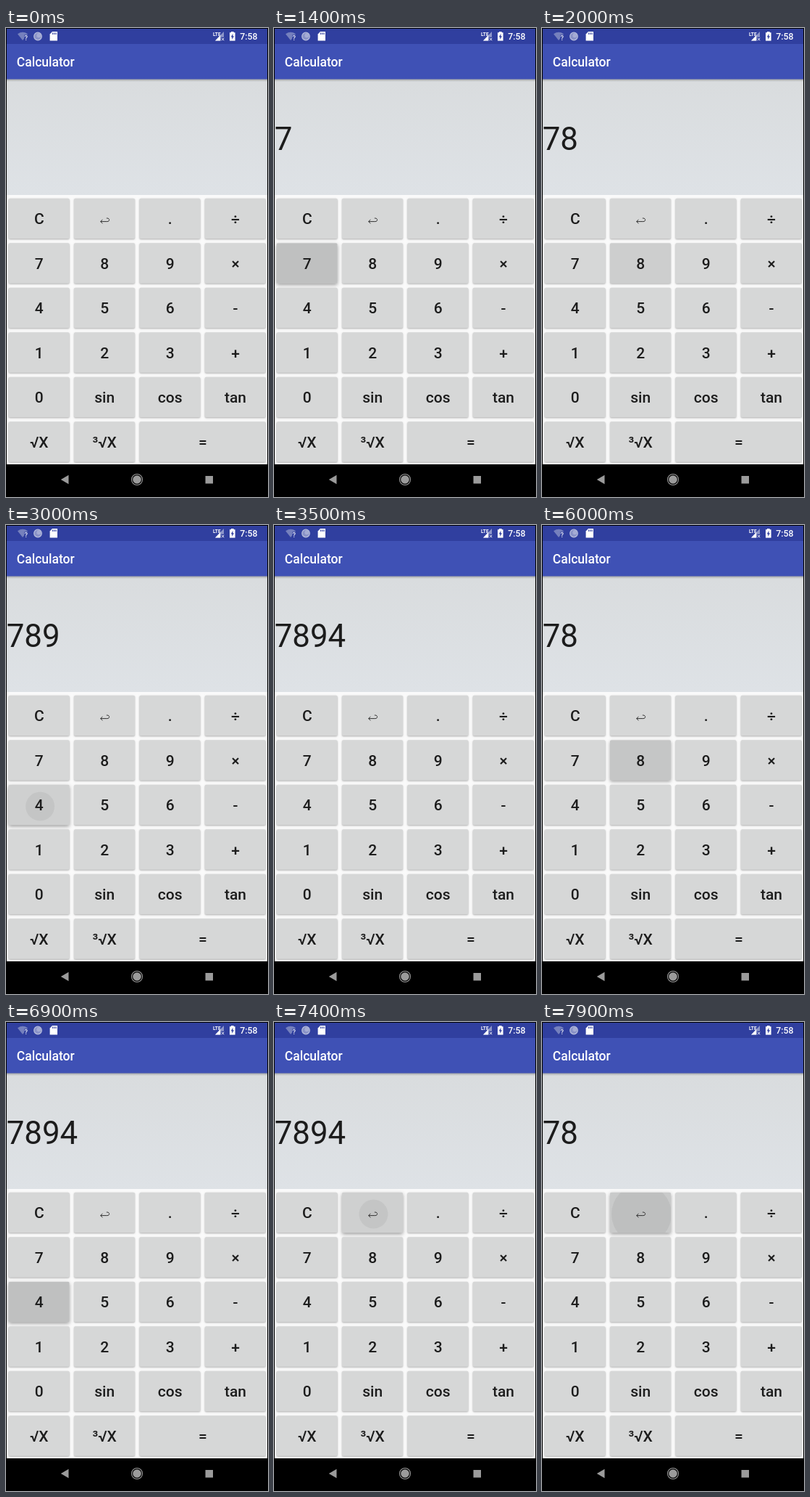
These frames come from a looping animation (362 by 646 pixels, 8000 ms). An HTML page with a canvas:

```html
<!DOCTYPE html>
<html lang="en">
<head>
<meta charset="utf-8">
<title>Calculator</title>
<style>
html, body { margin: 0; width: 100%; height: 100%; overflow: hidden; background: #000; }
canvas { display: block; width: 362px; height: 646px; }
</style>
</head>
<body>
<canvas id="stage"></canvas>
<script>
const W = 362, H = 646, LOOP = 8000;
const FONT = 'Roboto, "Noto Sans", sans-serif';
const canvas = document.getElementById('stage');
const ctx = canvas.getContext('2d');
const scale = window.devicePixelRatio || 1;
canvas.width = W * scale;
canvas.height = H * scale;

const ROWS = [
  ['C', '↩', '.', '÷'],
  ['7', '8', '9', '×'],
  ['4', '5', '6', '-'],
  ['1', '2', '3', '+'],
  ['0', 'sin', 'cos', 'tan'],
  ['√X', '³√X', '=']
];

// Press looks: button tint, ripple radius and tint, raised shadow
const LOOKS = {
  start:  { tint: .03,  radius: 20, ripple: .05, raised: 1 },
  spread: { tint: .06,  radius: 41.5, ripple: .055, raised: 1 },
  held:   { tint: .107, raised: 1 },
  dim:    { tint: .08,  raised: .6 },
  fade:   { tint: .042, raised: 0 }
};

// Start time, display text, touched key, look
const STEPS = [
  [0, ''],
  [1300, '', '7', 'start'], [1400, '7', '7', 'held'], [1600, '7', '7', 'fade'],
  [1700, '7', '8', 'spread'], [1800, '78', '8', 'dim'], [2000, '78', '8', 'fade'],
  [2200, '78', '9', 'start'], [2300, '78', '9', 'spread'], [2400, '789', '9', 'dim'], [2600, '789'],
  [3000, '789', '4', 'start'], [3100, '789', '4', 'spread'], [3200, '7894', '4', 'dim'], [3500, '7894'],
  [4200, '7894', 'C', 'start'], [4300, '7894', 'C', 'spread'], [4400, '', 'C', 'dim'], [4700, ''],
  [5500, '', '7', 'start'], [5600, '7', '7', 'held'], [5800, '7', '7', 'fade'],
  [5900, '7', '8', 'spread'], [6000, '78', '8', 'dim'],
  [6200, '78', '9', 'start'], [6300, '789', '9', 'dim'], [6600, '789'],
  [6800, '789', '4', 'start'], [6900, '7894', '4', 'held'], [7200, '7894'],
  [7400, '7894', '↩', 'start'], [7600, '789', '↩', 'held'],
  [7800, '789', '↩', 'start'], [7900, '78', '↩', 'spread']
];

function rect(x, y, w, h, color) {
  ctx.fillStyle = color;
  ctx.fillRect(x, y, w, h);
}

function disc(x, y, r, color) {
  ctx.fillStyle = color;
  ctx.beginPath();
  ctx.arc(x, y, r, 0, Math.PI * 2);
  ctx.fill();
}

function ring(x, y, r, width, color) {
  ctx.strokeStyle = color;
  ctx.lineWidth = width;
  ctx.beginPath();
  ctx.arc(x, y, r, 0, Math.PI * 2);
  ctx.stroke();
}

function shape(points, color) {
  ctx.fillStyle = color;
  ctx.beginPath();
  points.forEach(([x, y]) => ctx.lineTo(x, y));
  ctx.closePath();
  ctx.fill();
}

function text(str, x, y, size, weight, color, align = 'left') {
  ctx.font = `${weight} ${size}px ${FONT}`;
  ctx.textAlign = align;
  ctx.fillStyle = color;
  ctx.fillText(str, x, y);
}

function gradient(y, h, from, to) {
  const g = ctx.createLinearGradient(0, y, 0, y + h);
  g.addColorStop(0, from);
  g.addColorStop(1, to);
  rect(1, y, 360, h, g);
}

function drawStatusBar() {
  rect(1, 1, 360, 21, '#303f9f');
  // Wi-Fi
  ctx.fillStyle = '#7580bd';
  ctx.beginPath();
  ctx.moveTo(23, 17);
  ctx.lineTo(16, 8.2);
  ctx.quadraticCurveTo(23, 3.4, 30, 8.2);
  ctx.closePath();
  ctx.fill();
  rect(25.3, 9.5, 6, 8, '#303f9f');
  text('?', 25.6, 17, 9, 700, '#d5d9ec');
  // Sync
  disc(44, 11.5, 5.2, '#8992c7');
  ring(44, 11.5, 5.3, 1.2, '#b8bedd');
  disc(45.4, 10.3, 3, '#a5acd4');
  // Memory card
  shape([[64, 5], [71, 5], [71, 17.6], [60.6, 17.6], [60.6, 8.6]], '#fff');
  [64.1, 66.3, 68.5].forEach(x => rect(x, 6.4, 1.1, 2.6, '#303f9f'));
  // Mobile signal
  shape([[301, 5], [301, 17.5], [289, 17.5]], '#8e97ca');
  shape([[296, 10.2], [296, 17.5], [289, 17.5]], '#fff');
  rect(285.5, 4.5, 10.5, 6.5, '#303f9f');
  text('LTE', 286, 10.6, 6.5, 700, '#fff');
  rect(297, 12.6, 5, 5.4, '#303f9f');
  ctx.strokeStyle = '#fff';
  ctx.lineWidth = 1;
  ctx.beginPath();
  ctx.moveTo(298, 13.8); ctx.lineTo(301.2, 17.2);
  ctx.moveTo(301.2, 13.8); ctx.lineTo(298, 17.2);
  ctx.stroke();
  // Battery
  rect(311, 5, 3.6, 2, '#fff');
  rect(309, 6.2, 7.6, 11.4, '#fff');
  shape([[313.5, 7.8], [310.8, 12.6], [312.4, 12.6], [312.2, 16], [315, 11.2], [313.4, 11.2]], '#303f9f');
  text('7:58', 323.3, 16, 12.3, 500, '#fff');
}

function drawNavBar() {
  rect(0, 601, W, 45, '#000');
  shape([[75.8, 622], [86.5, 615.8], [86.5, 628.2]], '#9b9b9b');
  disc(181, 622, 5.8, '#9b9b9b');
  ring(181, 622, 7.5, 1.1, '#9b9b9b');
  rect(275.5, 617, 10.5, 10.5, '#9b9b9b');
}

function drawReturnArrow(x, y) {
  ctx.strokeStyle = '#333';
  ctx.lineWidth = 1;
  ctx.beginPath();
  ctx.moveTo(x - 5.5, y + 1.6);
  ctx.lineTo(x + 3.6, y + 1.6);
  ctx.bezierCurveTo(x + 7.4, y + 1.6, x + 7.4, y - 3, x + 3.6, y - 3);
  ctx.lineTo(x + 2.6, y - 3);
  ctx.moveTo(x - 2.8, y - 1);
  ctx.lineTo(x - 5.6, y + 1.6);
  ctx.lineTo(x - 2.8, y + 4.2);
  ctx.stroke();
}

function drawKey(label, col, row, look) {
  const x = 3.6 + 90.4 * col, y = 234.8 + 61.5 * row;
  const w = label === '=' ? 174.4 : 84, h = 55.5;
  const raised = look ? look.raised : 0;
  const outline = () => {
    ctx.beginPath();
    ctx.roundRect(x, y, w, h, 1.8);
  };

  ctx.save();
  ctx.shadowColor = `rgba(0,0,0,${.3 + .08 * raised})`;
  ctx.shadowBlur = (2.2 + 3 * raised) * scale;
  ctx.shadowOffsetY = (1 + raised) * scale;
  ctx.fillStyle = '#d6d7d7';
  outline();
  ctx.fill();
  ctx.restore();

  if (look) {
    ctx.save();
    outline();
    ctx.clip();
    rect(x, y, w, h, `rgba(0,0,0,${look.tint})`);
    if (look.radius) disc(x + w / 2 + 1.5, y + h / 2 + 2, look.radius, `rgba(0,0,0,${look.ripple})`);
    ctx.restore();
  }

  const cx = x + w / 2 + .2;
  if (label === '↩') drawReturnArrow(cx, 265);
  else text(label, cx, 270.3 + 61.5 * row, 21, 500, '#1c1c1c', 'center');
}

function draw(time) {
  const [, shown, pressed, look] = STEPS.findLast(step => step[0] <= time);
  ctx.setTransform(scale, 0, 0, scale, 0, 0);
  rect(0, 0, W, H, '#000');
  gradient(70, 160, '#d9dcde', '#dee2e6');
  gradient(70, 4, 'rgba(0,0,0,.28)', 'rgba(0,0,0,0)');
  rect(1, 22, 360, 48.5, '#3f51b5');
  drawStatusBar();
  text('Calculator', 14.8, 53, 17.5, 500, '#fff');
  text(shown, .7, 167.6, 43.8, 400, '#1c1c1c');

  rect(1, 230, 360, 371, '#fafafa');
  ROWS.forEach((labels, row) => labels.forEach((label, col) =>
    drawKey(label, col, row, label === pressed ? LOOKS[look] : null)));
  drawNavBar();
}

const begin = performance.now();
function tick() {
  draw((performance.now() - begin) % LOOP);
  requestAnimationFrame(tick);
}
tick();
</script>
</body>
</html>
```
